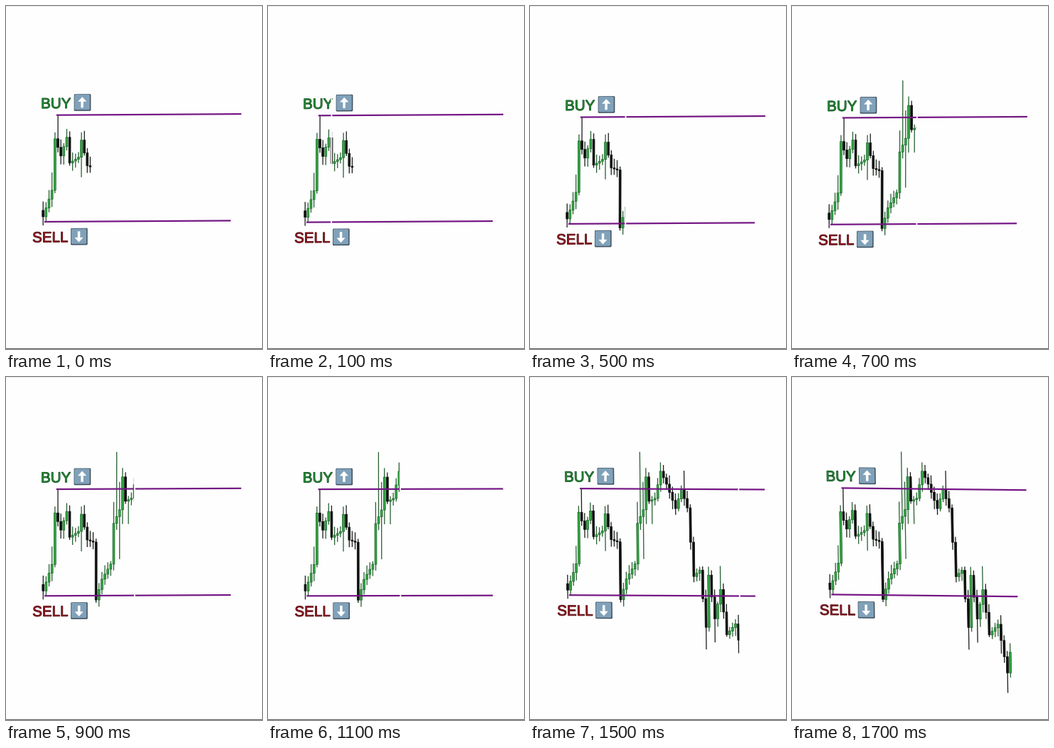
A matplotlib script that plays this animation: 360x480 px, repeating every 1.8 s.

```python
import numpy as np
import matplotlib
import matplotlib.pyplot as plt
from matplotlib.animation import FuncAnimation
from matplotlib.collections import LineCollection, PolyCollection
from matplotlib.patches import FancyBboxPatch, PathPatch, Polygon, Rectangle
from matplotlib.textpath import TextPath
from matplotlib.transforms import Affine2D

W, H, DPI = 360, 480, 100
FRAMES, STEP = 18, 100
PT = 72 / DPI  # points per pixel
PAPER = "#fefefe"
PURPLE = "#741684"
BULL, BULL_EDGE, BULL_WICK = "#33a843", "#1c6a2a", "#2a6234"
BEAR, BEAR_WICK = "#0d110e", "#1b201c"

matplotlib.rcParams["path.snap"] = False

CANDLES = 62
FIRST_X, SPACING = 53.2, 4.115

# Turning points of the price: candle number, height on the stage
TURNS = [(-1, 290), (0, 299), (3, 262), (4, 190), (6, 214), (8, 188),
         (9, 224), (12, 216), (13, 192), (15, 228), (17, 231), (18, 312),
         (20, 283), (23, 262), (24, 205), (26, 186), (27, 140), (28, 174),
         (30, 170), (32, 132), (34, 150), (37, 184), (39, 157), (41, 183),
         (43, 279), (45, 270), (47, 350), (48, 277), (50, 338), (52, 297),
         (54, 360), (57, 345), (60, 413), (61, 384)]
# Long wicks
PEAKS = {3: 237, 5: 157, 24: 175, 25: 105, 26: 147, 40: 131, 52: 264}
DIPS = {13: 244, 26: 255, 27: 206, 29: 206, 47: 381, 50: 371, 58: 386, 60: 441}

# Reveal edge over time
WIPE_T = [0, 300, 700, 1100, 1300, 1500, 1700]
WIPE_X = [88, 94, 176, 186.5, 207.5, 294, 309]
WIPE_START = 121

fig = plt.figure(figsize=(W / DPI, H / DPI), dpi=DPI, facecolor=PAPER)
ax = fig.add_axes([0, 0, 1, 1])
ax.set_xlim(0, W)
ax.set_ylim(H, 0)
ax.axis("off")

camera = Affine2D()
view = camera + ax.transData


def add_patch(patch, z):
    patch.set_transform(view)
    patch.set_zorder(z)
    ax.add_artist(patch)
    return patch


def make_prices():
    price = np.interp(np.arange(-1, CANDLES), *zip(*TURNS))
    opened, close = price[:-1], price[1:]
    rng = np.random.default_rng(4)
    reach = 3 + 10 * rng.random((2, CANDLES))
    high = np.minimum(opened, close) - reach[0]
    low = np.maximum(opened, close) + reach[1]
    for ends, spikes in ((high, PEAKS), (low, DIPS)):
        ends[list(spikes)] = list(spikes.values())
    return opened, close, high, low


def add_candles():
    opened, close, high, low = make_prices()
    xs = FIRST_X + SPACING * np.arange(CANDLES)
    rising = close < opened
    wicks = [[(x, h), (x, l)] for x, h, l in zip(xs, high, low)]
    bodies = [[(x - 1.4, o), (x + 1.4, o), (x + 1.4, c), (x - 1.4, c)]
              for x, o, c in zip(xs, opened, close)]

    def pick(up, down):
        return [up if r else down for r in rising]

    ax.add_collection(LineCollection(
        wicks, colors=pick(BULL_WICK, BEAR_WICK), linewidths=1.3 * PT,
        transform=view, zorder=1), autolim=False)
    ax.add_collection(PolyCollection(
        bodies, facecolors=pick(BULL, BEAR), edgecolors=pick(BULL_EDGE, BEAR),
        linewidths=0.8 * PT, transform=view, zorder=2), autolim=False)


def add_level(x0, x1, y):
    line, = ax.plot([x0, x1], [y, y], color=PURPLE, lw=2.2 * PT,
                    solid_capstyle="butt", zorder=4)
    line.set_transform(view)


def add_word(word, x, baseline, fill, edge):
    path = TextPath((0, 0), word, size=20.5, prop={"family": "Liberation Sans"})
    path = path.transformed(Affine2D().scale(1, -1).translate(x, baseline))
    add_patch(PathPatch(path, fc=fill, ec=edge, lw=1.0 * PT), 4)


def add_button(cx, cy, up):
    def box(shift, half, color):
        add_patch(FancyBboxPatch(
            (cx - half + shift, cy - half + shift), 2 * half, 2 * half,
            boxstyle="round,pad=0,rounding_size=1.5", fc=color, ec="none"), 4)

    box(0, 11.8, "#3f515f")
    box(-0.4, 10.7, "#80a1b9")
    arrow = np.array([(0, -7.5), (5.5, -1.5), (1.5, -1.5), (1.5, 7),
                      (-1.5, 7), (-1.5, -1.5), (-5.5, -1.5)])
    if not up:
        arrow[:, 1] *= -1
    add_patch(Polygon(arrow + (cx - 0.3, cy), fc="white", ec="white",
                      lw=0.5 * PT, joinstyle="round"), 5)


add_candles()
cover = add_patch(Rectangle((0, 60), 2 * W, 410, fc=PAPER, ec="none"), 3)
add_level(71.5, 330.5, 156.8)
add_level(55, 316, 306)
add_word("BUY", 49.8, 147.2, "#2ba63f", "#175524")
add_word("SELL", 38.2, 334.5, "#ad1823", "#5a1016")
add_button(108, 139.4, True)
add_button(103.7, 327, False)
cursor = add_patch(Rectangle((0, 60), 1.8, 410, fc=PAPER, ec="none"), 6)
ax.plot([0, W], [479.5, 479.5], color="#5c5c5c", lw=PT, zorder=7)
ax.plot([0, W], [0.3, 0.3], color="#e6e6e6", lw=PT, zorder=7)


def aim_camera(t):
    """Settle downwards at first, then lean slowly to the right."""
    lean = max(0, (t - 600) / 1100) ** 2
    tilt = -0.006 + 0.017 * lean
    shear = -0.002 + 0.018 * lean
    stretch = 0.004
    dx, dy = -0.3, -4.9 * max(0, 1 - t / 1100) ** 1.5
    # everything turns around the point (200, 230)
    camera.set_matrix(np.array([
        [1 + stretch, shear, dx - 200 * stretch - 230 * shear],
        [tilt, 1, dy - 200 * tilt],
        [0, 0, 1]]))


def draw(i):
    t = i * STEP
    aim_camera(t)
    x = np.interp(t, WIPE_T, WIPE_X)
    cover.set_x(max(x, WIPE_START))
    cursor.set_x(x - 0.9)
    cursor.set_visible(0 < i < FRAMES - 1)
    return cover, cursor


anim = FuncAnimation(fig, draw, frames=FRAMES, interval=STEP, repeat=True)
plt.show()
```
